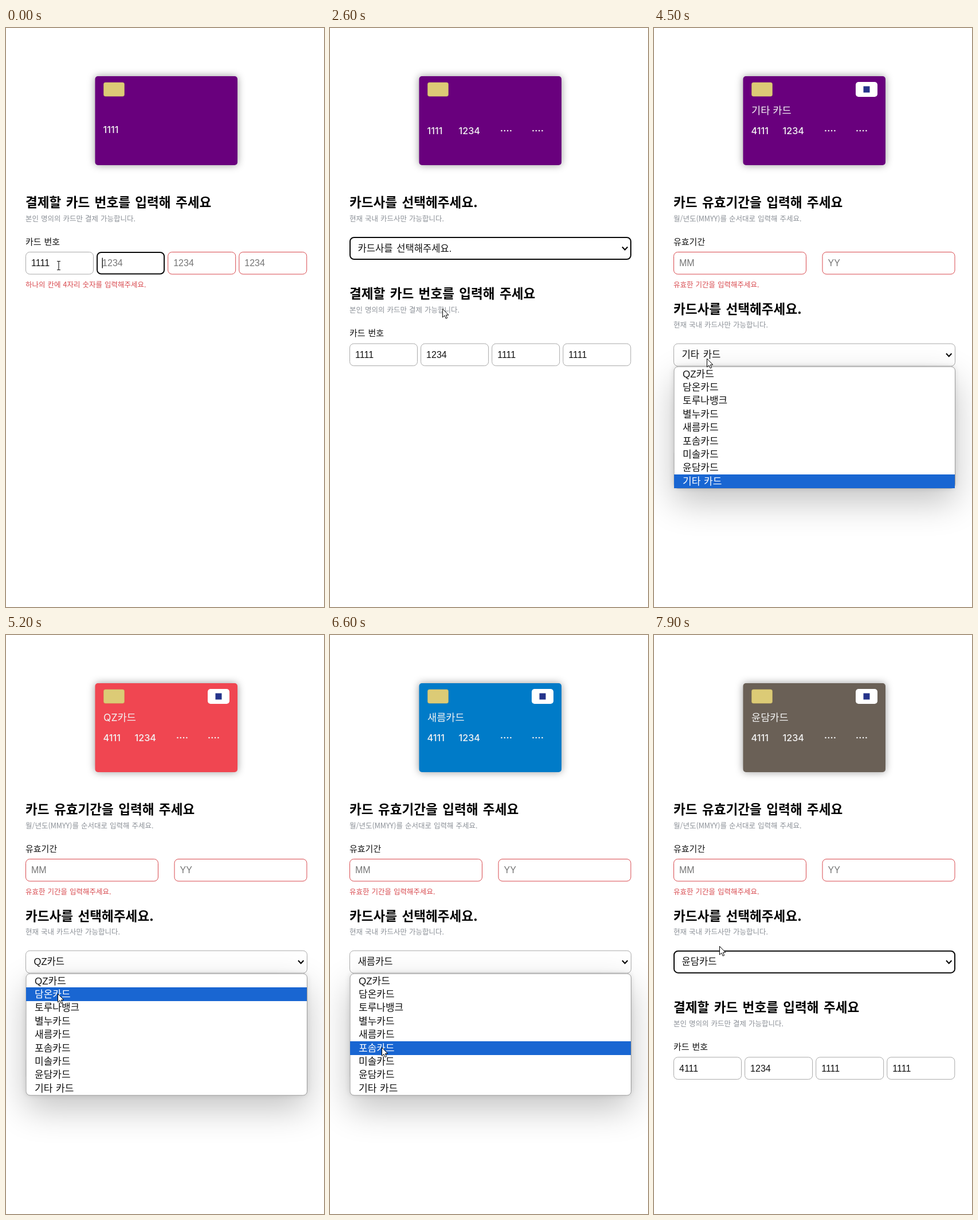
An HTML page with a canvas that plays this animation: 555 by 1009 pixels, repeating every 8 s.

```html
<!DOCTYPE html>
<html lang="ko">
<head>
<meta charset="utf-8">
<title>카드 등록</title>
<style>
  html, body { margin: 0; width: 100%; height: 100%; overflow: hidden; background: #fff; }
  canvas { display: block; width: 555px; height: 1009px; }
</style>
</head>
<body>
<canvas id="stage"></canvas>
<script>
const W = 555, H = 1009, LOOP = 8000, STEP = 100;
const canvas = document.getElementById('stage');
const ctx = canvas.getContext('2d');
const dpr = window.devicePixelRatio || 1;
canvas.width = W * dpr;
canvas.height = H * dpr;

const KO = '"Noto Sans CJK KR", "Noto Sans CJK", sans-serif';
const ARIAL = '"Liberation Sans", ' + KO;
const INTER = 'Inter, ' + KO;
const PURPLE = '#69007d', RED = '#d8494e', GREY = '#a9a9a9', BLACK = '#0a0a0a';
const ROW = 23.4, EXPIRY_H = 185.7, SELECT_H = 159.6, MENU_Y = 404;

const issuers = [
  ['QZ카드', '#f04651'], ['담온카드', '#0046ff'], ['토루나뱅크', '#ffe600'],
  ['별누카드', '#000000'], ['새름카드', '#007bc8'], ['포솜카드', '#ed1c24'],
  ['미솔카드', '#009490'], ['윤담카드', '#6a6056'], ['기타 카드', PURPLE]
];

// Moments of the form, in ms.
const SELECT_SHOWN = 2300, EDIT_FIRST = 2800, FIRST_MENU = 3700;

// The last issuer is chosen first, then the others from the top down.
// Each later menu opens shortly before its choice.
const choices = [4200, 4700, 5300, 5600, 5900, 6200, 6700, 7300, 7600].map((end, i) => ({
  end,
  start: i ? end - 200 : FIRST_MENU,
  issuer: (i + issuers.length - 1) % issuers.length,
  top: MENU_Y + (i ? EXPIRY_H : 0)
}));

const fieldX = i => 34 + i * 124.1;

// The pointer goes from the select to the row of each choice.
const path = [
  { t: 100, x: 92, y: 414 }, { t: 800, x: 244, y: 861 }, { t: 1900, x: 244, y: 861 },
  { t: 2200, x: fieldX(2) + 60, y: 410 }, { t: 2400, x: fieldX(2) + 60, y: 410 },
  { t: EDIT_FIRST, x: fieldX(0) + 16, y: 568 }, { t: 3300, x: fieldX(0) + 16, y: 568 },
  ...choices.flatMap(({ start, end, issuer, top }, i) => {
    const y = top + (issuer + 0.5) * ROW;
    return [
      { t: start, x: i ? 92 : 174, y: top - 14 },
      { t: end - 100, x: 90, y },
      { t: end, x: 90, y }
    ];
  }),
  { t: 7900, x: 114, y: 542 }
];

function pointerAt(t) {
  const i = path.findIndex(p => p.t > t);
  if (i <= 0) return path.at(i);
  const a = path[i - 1], b = path[i];
  const k = (t - a.t) / (b.t - a.t), e = k * k * (3 - 2 * k);
  return { x: a.x + (b.x - a.x) * e, y: a.y + (b.y - a.y) * e };
}

const typed = (s, start, t) => s.slice(0, Math.max(0, Math.floor((t - start) / 100) + 1));

function numbersAt(t) {
  return [
    t < 3200 ? '1111' : '4111',
    typed('1234', 300, t),
    t < SELECT_SHOWN ? typed('111', 900, t) : '1111',
    typed('1111', 1300, t)
  ];
}

// 0-3 are the number fields, 4 is the issuer select.
function focusAt(t) {
  if (t >= FIRST_MENU) return 4;
  if (t >= EDIT_FIRST) return 0;
  if (t >= SELECT_SHOWN) return 4;
  if (t >= 2200) return 2;
  if (t >= 1900) return -1;
  return t < 700 ? 1 : t < 1200 ? 2 : 3;
}

// Text is placed by its vertical centre.
function text(s, x, y, size, color, weight = 400, family = KO, space = 0) {
  ctx.font = `${weight} ${size}px ${family}`;
  ctx.wordSpacing = space + 'px';
  ctx.fillStyle = color;
  ctx.fillText(s, x, y + size * 0.37);
}

function box(x, y, w, h, r, fill, stroke, line = 1) {
  ctx.beginPath();
  ctx.roundRect(x, y, w, h, r);
  if (fill) { ctx.fillStyle = fill; ctx.fill(); }
  if (stroke) { ctx.strokeStyle = stroke; ctx.lineWidth = line; ctx.stroke(); }
}

function shadowBox(x, y, w, h, r, fill, dy, blur, alpha) {
  ctx.save();
  ctx.shadowColor = `rgba(0,0,0,${alpha})`;
  ctx.shadowBlur = blur * dpr;
  ctx.shadowOffsetY = dy * dpr;
  box(x, y, w, h, r, fill);
  ctx.restore();
}

// A 2px frame when focused, otherwise 1px.
function frame(x, y, w, h, focused, color) {
  const d = focused ? 1 : 0.5;
  box(x + d, y + d, w - 2 * d, h - 2 * d, 7, '#fff', focused ? BLACK : color, 2 * d);
}

function heading(title, sub, y) {
  text(title, 34, y + 303.5, 22.6, '#000', 700, KO, 3.2);
  text(sub, 34, y + 332, 12.5, '#8b9097', 300, KO, 1.2);
}

const errorText = (s, y) => text(s, 34, y + 447.3, 12.5, RED, 300, KO, 1.2);

function drawCard(numbers, pick) {
  shadowBox(155.5, 84, 248.5, 155, 5, pick < 0 ? PURPLE : issuers[pick][1], 0, 14, 0.4);
  box(170.5, 95, 36, 24, 3, '#dccb76', '#c9b763', 0.6);
  if (numbers[0][0] === '4') {
    box(352, 94, 38, 26, 5, '#fff');
    box(365.5, 101.5, 11, 11, 0, '#26348b');
  }
  if (pick >= 0) text(issuers[pick][0], 170, 143, 17.6, '#f3f3f3', 400, INTER);
  const done = numbers.map(n => n.length === 4);
  const y = done[2] || done[3] ? 179 : 177;
  numbers.forEach((n, i) => {
    if (!done[i]) return;
    if (i < 2) return text(n, 169.5 + i * 55, y, 16.2, '#f3f3f3', 500, INTER);
    ctx.fillStyle = '#f3f3f3';
    for (let k = 0; k < 4; k++) {
      ctx.beginPath();
      ctx.arc(299.5 + (i - 2) * 55 + k * 5.3, 179, 1.3, 0, 7);
      ctx.fill();
    }
  });
}

function drawExpiry() {
  heading('카드 유효기간을 입력해 주세요', '월/년도(MMYY)를 순서대로 입력해 주세요.', 0);
  text('유효기간', 34, 372, 15, '#111');
  ['MM', 'YY'].forEach((hint, i) => {
    const x = 34 + i * 259.5;
    frame(x, 390, 232, 39.5, false, RED);
    text(hint, x + 10, 409.3, 16, '#757575', 400, ARIAL);
  });
  errorText('유효한 기간을 입력해주세요.', 0);
}

function drawSelect(y, pick, focused) {
  heading('카드사를 선택헤주세요.', '현재 국내 카드사만 가능합니다.', y);
  frame(34, y + 364, 492, 40, focused, pick < 0 ? RED : GREY);
  const label = pick < 0 ? '카드사를 선택해주세요.' : issuers[pick][0];
  text(label, 48.5, y + 383.5, 16.6, '#111', 300, ARIAL, 2);
  ctx.beginPath();
  ctx.moveTo(510, y + 381.5);
  ctx.lineTo(514.7, y + 386.5);
  ctx.lineTo(519.4, y + 381.5);
  ctx.strokeStyle = '#000';
  ctx.lineWidth = 2;
  ctx.stroke();
}

function drawNumbers(y, numbers, focus) {
  heading('결제할 카드 번호를 입력해 주세요', '본인 명의의 카드만 결제 가능합니다.', y);
  text('카드 번호', 34, y + 372, 15, '#111', 400, KO, 1.5);
  numbers.forEach((n, i) => {
    const x = fieldX(i), active = focus === i;
    frame(x, y + 390, 119, 39.5, active, n.length === 4 ? GREY : RED);
    text(n || '1234', x + 10, y + 409.3, 16, n ? '#111' : '#757575', 400, ARIAL);
    if (!active) return;
    const before = i === 0 ? n[0] : n;
    ctx.fillStyle = '#000';
    ctx.fillRect(x + 9.5 + ctx.measureText(before).width, y + 400.5, 1.3, 18);
  });
  if (numbers.some(n => n.length < 4)) {
    errorText('하나의 칸에 4자리 숫자를 입력해주세요.', y);
  }
}

function drawMenu(top, pick, pointer) {
  shadowBox(34.5, top, 491, 212, 7, '#fff', 24, 60, 0.24);
  shadowBox(34.5, top, 491, 212, 7, '#fff', 0, 10, 0.13);
  const over = Math.floor((pointer.y - top) / ROW);
  const hover = over >= 0 && over < issuers.length ? over : pick;
  box(35, top + 0.5, 490.5, 212, 7, '#fff', '#999');
  issuers.forEach(([name], i) => {
    const y = top + 0.9 + i * ROW;
    if (i === hover) {
      ctx.fillStyle = '#1966d2';
      ctx.fillRect(35, Math.round(y), 490, 24);
    }
    text(name, 50, y + 11.7, 17, i === hover ? '#fff' : '#111', 300, ARIAL, 1);
  });
}

function drawArrow({ x, y }) {
  ctx.beginPath();
  [[0.5, 0.5], [0.5, 15.2], [3.9, 12], [6.2, 17.3], [8.6, 16.2], [6.4, 11.2], [10.8, 11.2]]
    .forEach(([dx, dy]) => ctx.lineTo(x + dx, y + dy));
  ctx.closePath();
  ctx.fillStyle = '#fff';
  ctx.fill();
  ctx.strokeStyle = '#000';
  ctx.lineWidth = 1;
  ctx.stroke();
}

function drawBeam({ x, y }) {
  ctx.beginPath();
  for (const s of [-1, 1]) {
    ctx.moveTo(x - 3, y + 7.5 * s);
    ctx.lineTo(x + 3, y + 7.5 * s);
  }
  ctx.moveTo(x, y - 7.5);
  ctx.lineTo(x, y + 7.5);
  ctx.strokeStyle = '#111';
  ctx.lineWidth = 1.1;
  ctx.stroke();
}

function draw(t) {
  const numbers = numbersAt(t), focus = focusAt(t), pointer = pointerAt(t);
  const pick = choices.findLast(c => c.end <= t)?.issuer ?? -1;
  const menu = choices.find(c => t >= c.start && t < c.end);
  const hasSelect = t >= SELECT_SHOWN, hasExpiry = pick >= 0;
  const selectY = hasExpiry ? EXPIRY_H : 0;
  const numberY = selectY + (hasSelect ? SELECT_H : 0);

  ctx.setTransform(dpr, 0, 0, dpr, 0, 0);
  ctx.fillStyle = '#fff';
  ctx.fillRect(0, 0, W, H);
  drawCard(numbers, pick);
  if (hasExpiry) drawExpiry();
  if (hasSelect) drawSelect(selectY, pick, focus === 4 && !menu);
  drawNumbers(numberY, numbers, focus);
  if (menu) drawMenu(menu.top, pick, pointer);

  const dy = pointer.y - numberY;
  const inField = !menu && dy > 390 && dy < 430 &&
    numbers.some((n, i) => pointer.x > fieldX(i) && pointer.x < fieldX(i) + 119);
  (inField ? drawBeam : drawArrow)(pointer);
}

const begin = performance.now();
function tick() {
  const t = (performance.now() - begin) % LOOP;
  draw(Math.floor(t / STEP) * STEP);
  requestAnimationFrame(tick);
}
tick();
</script>
</body>
</html>
```
